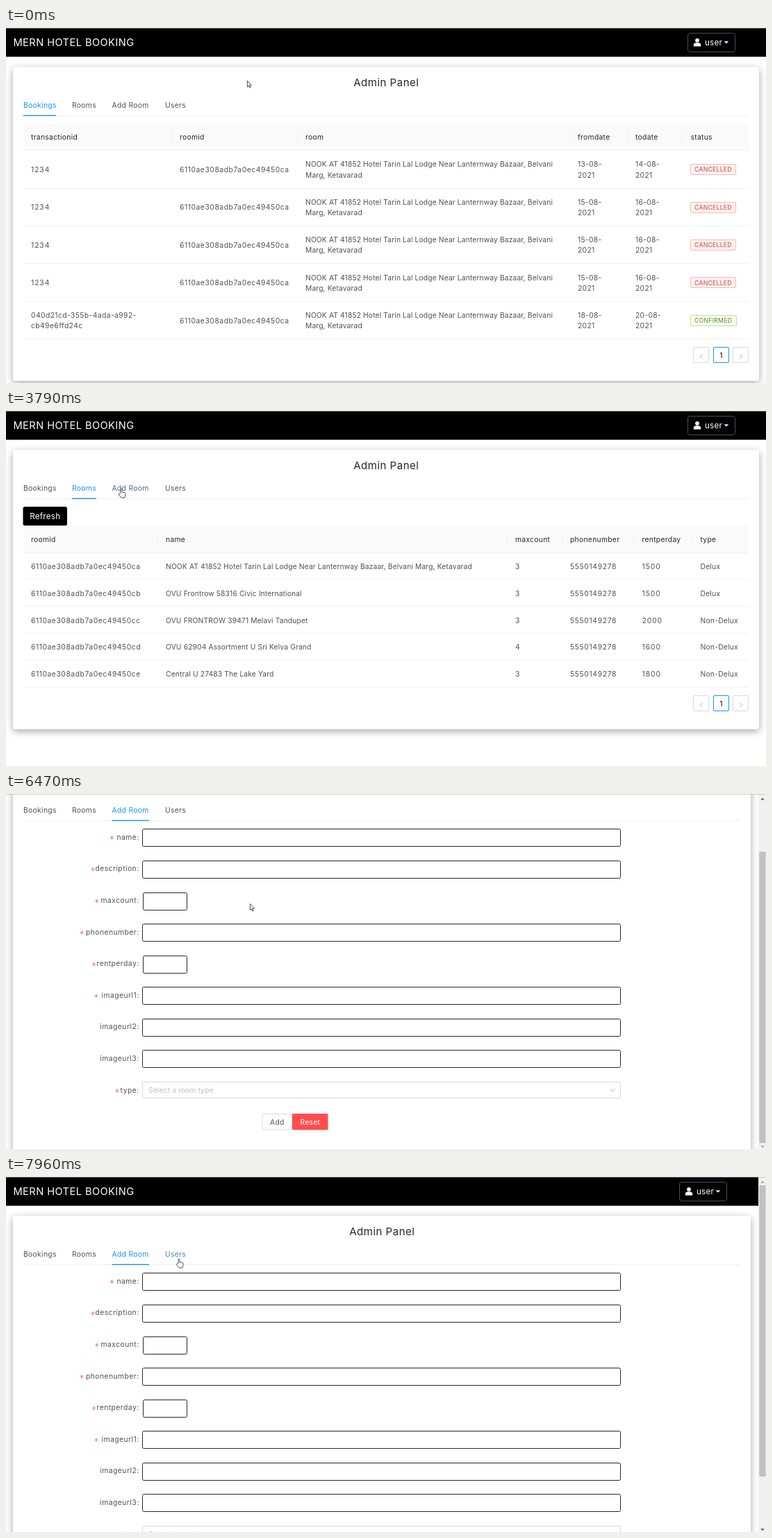
Recreate the animation shown at these times as an HTML page. Size 1094 by 512 pixels, loop 8 s.

```html
<!DOCTYPE html>
<html lang="en">
<head>
<meta charset="utf-8">
<title>Admin Panel</title>
<style>
html, body { margin: 0; width: 100%; height: 100%; overflow: hidden; background: #fff; }
svg { display: block; width: 1094px; height: 512px; font-family: Inter, "Open Sans", sans-serif; }
text { white-space: pre; }
#card { filter: drop-shadow(0 3.6px 5.5px rgba(0, 0, 0, .35)); }
</style>
</head>
<body>
<svg id="stage" viewBox="0 0 1094 512" xmlns="http://www.w3.org/2000/svg"></svg>
<script>
const NS = 'http://www.w3.org/2000/svg';
const LOOP = 8000;
const INK = '#505050', DARK = '#262626', LINE = '#f0f0f0', BLUE = '#1890ff';
const stage = document.getElementById('stage');

function add(parent, tag, attrs = {}) {
  const el = document.createElementNS(NS, tag);
  set(el, attrs);
  return parent.appendChild(el);
}
function set(el, attrs) {
  for (const k in attrs) el.setAttribute(k, attrs[k]);
}
function box(parent, x, y, width, height, fill, stroke = 'none', rx = 0) {
  return add(parent, 'rect', { x, y, width, height, fill, stroke, rx });
}
function path(parent, d, attrs) {
  return add(parent, 'path', { d, fill: 'none', ...attrs });
}
function text(parent, str, x, y, { size = 10.3, ls = 0.3, fill = INK, weight = 400, anchor = 'start' } = {}) {
  const el = add(parent, 'text', {
    x, y, fill, 'font-size': size, 'letter-spacing': ls, 'font-weight': weight, 'text-anchor': anchor
  });
  el.textContent = str;
  return el;
}
// centre of the pixel that holds v, for sharp 1px strokes
const snap = v => Math.floor(v) + 0.5;

const ID = { ls: 0.56 }, NUM = { ls: 0.67 }, COUNT = { ls: 0.95 }, PROSE = { ls: 0.12 };

// ---- page frame
const page = add(stage, 'g');
const card = box(page, 10, 56, 1074, 453, '#fff', 'none', 4);
card.id = 'card';
box(page, 0, 0, 1094, 41.5, '#000');
text(page, 'MERN HOTEL BOOKING', 10.5, 26, { size: 14.6, ls: 0.44, fill: '#fff' });

const menu = add(page, 'g');
box(menu, 981.5, 7.5, 68, 27, '#000', '#4a4f55', 3);
add(menu, 'circle', { cx: 995, cy: 17.8, r: 2.9, fill: '#fff' });
path(menu, 'M989.8 26.6V24.6Q990 21.6 993 21.3H997Q1000 21.6 1000.2 24.6V26.6Z', { fill: '#fff' });
text(menu, 'user', 1006, 25, { size: 11.7, ls: 0.2, fill: '#fff' });
path(menu, 'M1033.6 19.2h6.6l-3.3 3.4Z', { fill: '#fff' });

const title = add(page, 'g');
text(title, 'Admin Panel', 547.3, 83.8, { size: 15.1, ls: 0.45, fill: DARK, anchor: 'middle' });

const tabLine = box(page, 25, 126, 1044, 1, LINE);
const ink = box(page, 25, 125.6, 47, 1.4, BLUE);

// level 0 idle, 1 hovered, 2 active
const tabs = [
  { name: 'Bookings', x: 25, level: [[0, 2], [1860, 2], [2130, 0]] },
  { name: 'Rooms', x: 95, level: [[1110, 0], [1330, 1], [1860, 1], [2000, 2], [4130, 2], [4330, 0]] },
  { name: 'Add Room', x: 152.5, level: [[3690, 0], [4000, 1], [4130, 1], [4300, 2]] },
  { name: 'Users', x: 229, level: [[7850, 0], [8060, 1]] }
];
tabs.forEach(tab => { tab.el = text(page, tab.name, tab.x, 114.6, { ls: 0.33 }); });

// ---- tables
function tableHead(g, y, height, cols, names) {
  box(g, 25, y, 1044, height, '#fafafa');
  names.forEach((name, i) => {
    text(g, name, cols[i], y + height / 2 + 3.8, { fill: DARK });
    if (i) box(g, Math.floor(cols[i] - 12), y + 11.5, 1, 16, LINE);
  });
  rule(g, y + height);
}
function rule(g, y) {
  box(g, 25, Math.floor(y - 0.5), 1044, 1, LINE);
}
function pager(g, y) {
  [989.5, 1018.5, 1046.5].forEach((x, i) =>
    box(g, x, y, 22, 22, '#fff', i === 1 ? BLUE : '#d9d9d9', 1.5));
  text(g, '1', 1029.5, y + 15.2, { weight: 500, fill: DARK, anchor: 'middle', ls: 0 });
  const arrow = { stroke: '#c4c4c4', 'stroke-width': 1 };
  path(g, `M1003.2 ${y + 10.4}l-4.6 2.8 4.6 2.8`, arrow);
  path(g, `M1056 ${y + 10.4}l4.6 2.8 -4.6 2.8`, arrow);
}

const place = ['NOOK AT 41852 Hotel Tarin Lal Lodge Near Lanternway Bazaar, Belvani', 'Marg, Ketavarad'];
const roomId = '6110ae308adb7a0ec49450c';

const bookings = add(page, 'g');
const bookCols = [36, 250, 431, 823, 906, 985.5];
tableHead(bookings, 138, 39, bookCols, ['transactionid', 'roomid', 'room', 'fromdate', 'todate', 'status']);
function pair(g, lines, x, mid, style) {
  lines.forEach((s, i) => text(g, s, x, mid - 3.9 + i * 15.2, style));
}
[[13, 14], [15, 16], [15, 16], [15, 16], [18, 20]].forEach(([from, to], i) => {
  const mid = 204.2 + i * 54.4, g = bookings, done = i === 4;
  if (done) pair(g, ['040d21cd-355b-4ada-a992-', 'cb49e6ffd24c'], 36, mid, { ls: 0.42 });
  else text(g, '1234', 36, mid + 3.8, COUNT);
  text(g, roomId + 'a', 250, mid + 3.8, ID);
  pair(g, place, 431, mid, PROSE);
  pair(g, [from + '-08-', '2021'], 823, mid);
  pair(g, [to + '-08-', '2021'], 906, mid);
  box(g, 985.5, snap(mid - 7.5), done ? 66 : 65, 15, done ? '#f8ffee' : '#fff1f0', done ? '#c3dc9c' : '#f7b9b5', 1.5);
  text(g, done ? 'CONFIRMED' : 'CANCELLED', 991, mid + 3.1,
    { size: 8.7, ls: 0.25, fill: done ? '#64833a' : '#c84643' });
  rule(g, mid + 27.4);
});
pager(bookings, 460.5);

const rooms = add(page, 'g');
const roomCols = [36, 230, 733, 812, 915.5, 999.5];
box(rooms, 24.5, 138, 63.5, 27.5, '#000', 'none', 3);
text(rooms, 'Refresh', 56.3, 156, { size: 11.7, ls: 0.22, fill: '#fff', anchor: 'middle' });
tableHead(rooms, 165.5, 39, roomCols, ['roomid', 'name', 'maxcount', 'phonenumber', 'rentperday', 'type']);
[
  [place.join(' '), 3, 1500, 'Delux'],
  ['OVU Frontrow 58316 Civic International', 3, 1500, 'Delux'],
  ['OVU FRONTROW 39471 Melavi Tandupet', 3, 2000, 'Non-Delux'],
  ['OVU 62904 Assortment U Sri Kelva Grand', 4, 1600, 'Non-Delux'],
  ['Central U 27483 The Lake Yard', 3, 1800, 'Non-Delux']
].forEach(([name, max, rent, type], i) => {
  const mid = 223.8 + i * 38.95, y = mid + 3.8;
  const cells = [roomId + 'abcde'[i], name, max, '5550149278', rent, type];
  const styles = [ID, PROSE, NUM, NUM, COUNT, { ls: 0.22 }];
  cells.forEach((c, k) => text(rooms, c, roomCols[k], y, styles[k]));
  rule(rooms, mid + 19.5);
});
pager(rooms, 410.5);

// ---- form; each field: label, star x (0 = optional)
const form = add(page, 'g');
[
  ['name', 152.5], ['description', 125], ['maxcount', 130.7], ['phonenumber', 109], ['rentperday', 126.5],
  ['imageurl1', 130], ['imageurl2', 0], ['imageurl3', 0], ['type', 160]
].forEach(([label, star], i) => {
  const y = 138.5 + i * 45.63;
  text(form, label, 188.2, y + 15.2, { anchor: 'end', ls: 0.48 });
  text(form, ':', 188.4, y + 15.2);
  if (star) path(form, `M${star} ${y + 9.5}v6m-2.4 -4.5l4.8 3m0 -3l-4.8 3`, { stroke: '#ff7a5c', 'stroke-width': 0.9 });
  if (label === 'type') return;
  const small = i === 2 || i === 4;
  box(form, small ? 197.5 : 196.5, snap(y) + (i === 2), small ? 63 : 688, 25, '#fff', '#262626', 2);
});
box(form, 196.5, 503.5, 688, 23, '#fff', '#d9d9d9', 1.5);
text(form, 'Select a room type', 205, 518.8, { ls: 0.13, fill: '#bfbfbf' });
path(form, 'M869.5 513l3.5 4.2 3.5 -4.2', { stroke: '#bcbcbc', 'stroke-width': 1 });
box(form, 369, 549.5, 43, 22.5, '#fff', '#d9d9d9', 1.5);
text(form, 'Add', 390.3, 564.8, { anchor: 'middle' });
box(form, 412, 549, 51.5, 23.5, '#ff4d4f', 'none', 1.5);
text(form, 'Reset', 437.8, 564.8, { fill: '#fff', anchor: 'middle' });

// ---- scrollbar, window edge, pointer
const bar = add(stage, 'g');
box(bar, 1083, 0, 11, 512, '#f1f1f1');
const thumb = box(bar, 1084.3, 12, 9.2, 420, '#c1c1c1');
const up = path(bar, 'M1086.3 8.6h5.4l-2.7 -3Z');
const down = path(bar, 'M1086.3 507.2h5.4l-2.7 3Z');
box(stage, 0, 0, 1094, 1, 'rgba(165,165,165,.5)');

const pen = { fill: '#fff', stroke: '#222', 'stroke-width': 0.8, 'stroke-linejoin': 'round' };
const pointer = add(stage, 'g');
const shapes = {
  arrow: path(pointer, 'M.4 .4V9.6L2.4 7.7 3.8 10.8 5.1 10.2 3.7 7.2H6.4Z', pen),
  hand: path(pointer, 'M-1 6.5V1.2A1 1 0 0 1 1 1.2V4.8L5 5.6Q6.3 5.9 6.1 7.4L5.6 10.8 4.9 13H.2L-3.3 8.8Q-3.9 7.4 -2.6 7Z', pen),
  beam: path(pointer, 'M-2 -5H-.6L0 -4.4 .6 -5H2M0 -4.4V4.4M-2 5H-.6L0 4.4 .6 5H2', { stroke: '#444', 'stroke-width': 0.9 })
};

// ---- timeline
const pointerMove = [
  [510, 347, 75.5], [1260, 114.7, 113.7], [3260, 114.7, 113.7], [4060, 184, 111.5], [4730, 184, 111.5],
  [5060, 352, 162.3], [5680, 352, 162.3], [5880, 351, 158], [6940, 351, 158], [7150, 351, 157.5],
  [7210, 351, 157.5], [7960, 249, 118]
];
const pointerShape = [
  [0, 'arrow'], [1130, 'hand'], [3490, 'arrow'], [3690, 'hand'], [4810, 'arrow'], [4900, 'beam'],
  [5780, 'arrow'], [7060, 'beam'], [7580, 'arrow'], [7850, 'hand']
];
const scrollMove = [
  [5050, 0], [5260, 63], [5400, 88], [6540, 88], [6740, 52], [6940, 11], [7100, 2], [7210, 0]
];
const inkMove = [[1860, 25, 47], [2160, 95, 35], [4130, 95, 35], [4330, 152.5, 53.7]];
const tabColors = [[80, 80, 80], [64, 169, 255], [24, 144, 255]];

const smooth = p => p * p * (3 - 2 * p);
const linear = p => p;

function sample(keys, t, ease = smooth) {
  if (t <= keys[0][0]) return keys[0].slice(1);
  for (let i = 1; i < keys.length; i++) {
    const a = keys[i - 1], b = keys[i];
    if (t < b[0]) {
      const p = ease((t - a[0]) / (b[0] - a[0]));
      return a.slice(1).map((v, k) => v + (b[k + 1] - v) * p);
    }
  }
  return keys[keys.length - 1].slice(1);
}
function tabColor(level, t) {
  const from = level.findLast(k => k[0] <= t) || level[0];
  const to = level.find(k => k[0] > t) || from;
  const p = to === from ? 0 : smooth(Math.max(0, (t - from[0]) / (to[0] - from[0])));
  const a = tabColors[from[1]], b = tabColors[to[1]];
  return `rgb(${a.map((v, i) => Math.round(v + (b[i] - v) * p))})`;
}
const show = (el, on) => el.setAttribute('display', on ? 'inline' : 'none');

function render(t) {
  const pane = t < 1860 ? 0 : t < 4130 ? 1 : 2;
  const narrow = pane === 2;
  [bookings, rooms, form].forEach((g, i) => show(g, i === pane));
  show(bar, narrow);
  set(card, { width: narrow ? 1062 : 1074, height: [453, 403, 560][pane] });
  set(tabLine, { width: narrow ? 1032 : 1044 });
  set(menu, { transform: `translate(${narrow ? -12 : 0} 0)` });
  set(title, { transform: `translate(${narrow ? -6 : 0} 0)` });

  const [inkX, inkW] = sample(inkMove, t);
  set(ink, { x: inkX, width: inkW });
  tabs.forEach(tab => set(tab.el, { fill: tabColor(tab.level, t) }));

  const scroll = Math.round(sample(scrollMove, t, linear)[0]);
  set(page, { transform: `translate(0 ${-scroll})` });
  set(thumb, { y: 12 + scroll * 0.81 });
  set(up, { fill: scroll > 0 ? '#505050' : '#a3a3a3' });
  set(down, { fill: scroll < 88 ? '#505050' : '#a3a3a3' });

  const [x, y] = sample(pointerMove, t);
  set(pointer, { transform: `translate(${x} ${y})` });
  const shape = pointerShape.findLast(k => k[0] <= t)[1];
  for (const name in shapes) show(shapes[name], name === shape);
}

const start = performance.now();
function tick() {
  render((performance.now() - start) % LOOP);
  requestAnimationFrame(tick);
}
tick();
</script>
</body>
</html>
```
